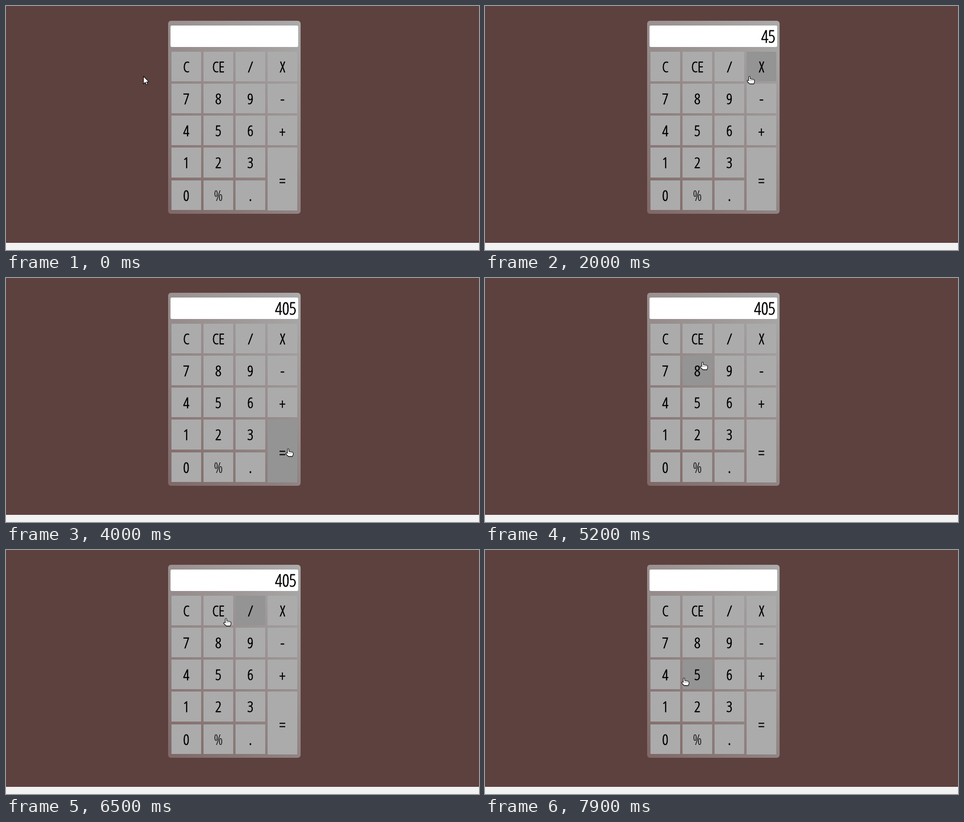
These frames come from a looping animation (989 px wide and 512 px high, 8 s). An HTML page:

```html
<!DOCTYPE html>
<html lang="en">
<head>
<meta charset="utf-8">
<title>Calculator</title>
<style>
  html, body { margin: 0; width: 100%; height: 100%; overflow: hidden; background: #5d413e; }
  svg { display: block; width: 989px; height: 512px; }
  text {
    font: 300 32px "Open Sans", "Noto Sans", sans-serif;
    font-stretch: 75%;
    text-anchor: middle;
    stroke: #000;
    stroke-width: .9;
  }
  .thin { stroke: none; }
  #display { font-size: 37px; text-anchor: end; }
  .key { fill: #ababab; }
  .key.hover { fill: #949494; }
  .cursor { fill: #fff; stroke: #000; stroke-width: 1.1; stroke-linejoin: round; }
</style>
</head>
<body>
<svg viewBox="0 0 989 512">
  <defs>
    <linearGradient id="metal" gradientUnits="userSpaceOnUse" x1="307" y1="404" x2="648" y2="63">
      <stop offset="0" stop-color="#7f6867"/>
      <stop offset="1" stop-color="#ababab"/>
    </linearGradient>
  </defs>
  <rect width="989" height="512" fill="#5d413e"/>
  <rect y="497" width="989" height="15" fill="#f2f2f2"/>
  <rect x="339" y="31" width="277" height="405" rx="6" fill="url(#metal)"/>
  <rect x="344" y="41" width="267" height="45" rx="3" fill="#fff"/>
  <text id="display" x="607" y="77"></text>
  <g id="keys"></g>
  <g id="pointer">
    <path id="arrow" class="cursor" d="M.5 .5V16.5l3.7-3.4 2.5 5.4 2.6-1.2-2.5-5.1h5z"/>
    <g id="hand">
      <path class="cursor" d="M-1.5 9.5V2a1.5 1.5 0 0 1 3 0V6l7 1.2q2 .4 2 2.3v3l-1.5 4h-8.5L-4.5 11.5q-1-2.5 1-2.5z"/>
      <path d="M.5 9.5h8" stroke="#000" stroke-dasharray="1 1.5" fill="none"/>
      <path d="M.5 16.5h8.5" stroke="#000" stroke-width="1.5"/>
    </g>
  </g>
</svg>
<script>
const LOOP = 8000, STEP = 100, HOVER_LAG = 60;
const $ = id => document.getElementById(id);

// pointer moves: start time, end time, x, y; it rests in between
const origin = [287, 147];
const moves = [
  [200, 1100, 402, 265], [1100, 1400, 445, 262], [1500, 2000, 553, 147], [2000, 2400, 572, 128],
  [2600, 2900, 525, 190], [3300, 4000, 590, 358], [4700, 5200, 455, 176], [5200, 5600, 505, 140],
  [5600, 6000, 472, 219], [6000, 6400, 530, 145], [6400, 6500, 460, 143], [6500, 6700, 390, 141],
  [6800, 7600, 384, 170], [7600, 7900, 416, 268]
];
const entries = [[0, ''], [1000, '4'], [1600, '45'], [2300, '45*'], [3100, '45*9'], [4000, '405'], [6900, '']];

function add(tag, attrs, label = '') {
  const el = document.createElementNS('http://www.w3.org/2000/svg', tag);
  for (const name in attrs) el.setAttribute(name, attrs[name]);
  el.textContent = label;
  return $('keys').appendChild(el);
}

const keys = ['C CE / X', '7 8 9 -', '4 5 6 +', '1 2 3 =', '0 % .'].flatMap((row, r) =>
  row.split(' ').map((label, c) => {
    const x = 346 + 67 * c, y = 96 + 67 * r + (r > 3 ? 2 : 0), w = 62;
    const h = label === '=' ? 132 : r === 3 ? 63 : 62;
    const el = add('rect', { class: 'key', x, y, width: w, height: h });
    const drop = '+='.includes(label) ? 3 : 0;
    add('text', { x: x + w / 2, y: y + h / 2 + 11.5 + drop, class: label === '%' ? 'thin' : '' }, label);
    return { el, x, y, w, h };
  }));

const easeOut = k => Math.sin(k * Math.PI / 2);

function pointerAt(t) {
  let [x, y] = origin;
  for (const [from, to, tx, ty] of moves) {
    if (t <= from) break;
    const k = easeOut(Math.min(1, (t - from) / (to - from)));
    x += (tx - x) * k;
    y += (ty - y) * k;
  }
  return [x, y];
}

function draw(now) {
  const t = Math.floor(now % LOOP / STEP) * STEP;
  const [x, y] = pointerAt(t);
  const [hx, hy] = pointerAt(t - HOVER_LAG);
  let over = false;
  for (const k of keys) {
    const hit = hx >= k.x && hx < k.x + k.w && hy >= k.y && hy < k.y + k.h;
    k.el.classList.toggle('hover', hit);
    over = over || hit;
  }
  $('hand').style.display = over ? '' : 'none';
  $('arrow').style.display = over ? 'none' : '';
  $('pointer').setAttribute('transform', `translate(${Math.round(x)} ${Math.round(y)})`);
  $('display').textContent = entries.filter(([time]) => time <= t).pop()[1];
}

const start = performance.now();
function tick() {
  draw(performance.now() - start);
  requestAnimationFrame(tick);
}
tick();
</script>
</body>
</html>
```
